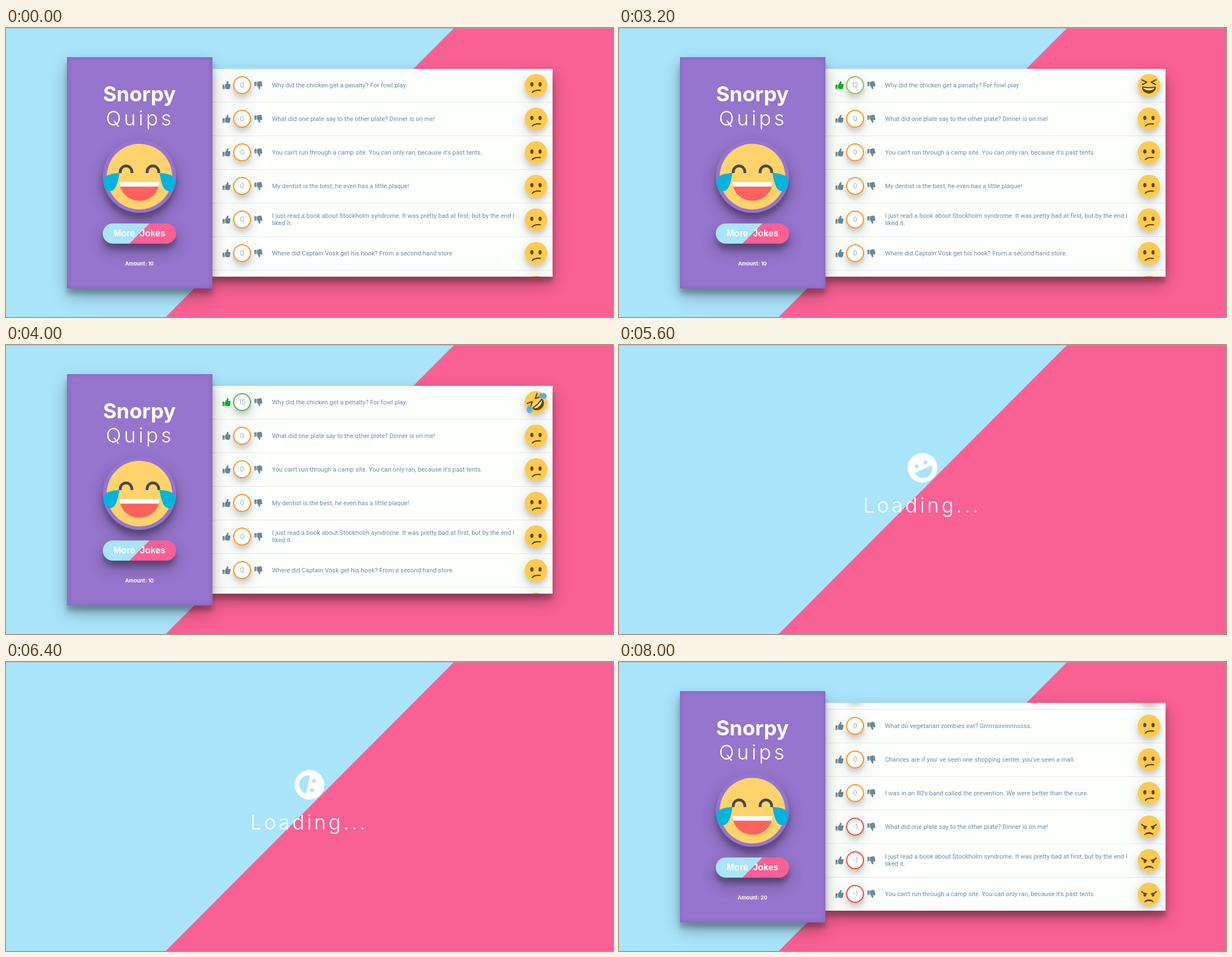
These frames come from a looping animation (1085x516 px, 10000 ms). An HTML page:

```html
<!DOCTYPE html>
<html lang="en">
<head>
<meta charset="utf-8">
<title>Snorpy Quips</title>
<style>
  html, body { margin: 0; width: 100%; height: 100%; overflow: hidden; }
  body {
    --blue: #a9e4fb; --pink: #f96093; --grey: #6d8b99;
    --lift: 0 13px 27px rgba(0,0,0,.3), 0 10px 8px rgba(0,0,0,.22);
    font-family: Inter, "Noto Sans", sans-serif;
  }
  div, svg { position: absolute; box-sizing: border-box; }
  svg { overflow: visible; }

  #stage { left: 0; top: 0; width: 1085px; height: 516px; overflow: hidden; background: var(--pink); }
  #bg { left: 0; top: 0; }
  #app, #loader { left: 0; top: 0; width: 1085px; height: 516px; }
  #app { animation: app 10s step-end infinite; }
  #loader { opacity: 0; animation: loader 10s step-end infinite; }
  @keyframes app { 0% { opacity: 1 } 56% { opacity: 0 } 72%, 100% { opacity: 1 } }
  @keyframes loader { 0% { opacity: 0 } 56% { opacity: 1 } 72%, 100% { opacity: 0 } }

  .side {
    left: 108.5px; top: 52px; width: 260.5px; height: 413px; background: #9575cd;
    box-shadow: var(--lift), inset 0 0 10px rgba(95,50,170,.3);
  }
  .badge {
    left: 173.3px; top: 199.8px; width: 130.6px; height: 130.6px;
    border-radius: 50%; background: #9575cd; box-shadow: var(--lift);
  }
  .more {
    left: 173.3px; top: 349px; width: 130.7px; height: 36.4px; border-radius: 19px;
    background: linear-gradient(135deg, var(--blue) 50%, var(--pink) 50%);
    color: #fff; font: bold 16px/36.4px "Liberation Sans", Arial, sans-serif;
    text-align: center; white-space: pre;
    box-shadow: var(--lift); animation: hover 10s step-end infinite;
  }
  @keyframes hover {
    0% { transform: none; box-shadow: var(--lift) }
    48% { transform: translateY(-1.2px); box-shadow: 0 9px 20px rgba(0,0,0,.2) }
    56%, 100% { transform: none; box-shadow: var(--lift) }
  }
  .ten { animation: first 10s step-end infinite; }
  .twenty { opacity: 0; animation: second 10s step-end infinite; }
  @keyframes first { 0% { opacity: 1 } 56%, 100% { opacity: 0 } }
  @keyframes second { 0% { opacity: 0 } 56%, 100% { opacity: 1 } }

  .card { left: 369px; top: 73px; width: 607.5px; height: 371px; background: #fdfffd; box-shadow: var(--lift); }
  .list { inset: 0; overflow: hidden; }
  #before { animation: before 10s step-end infinite; }
  #after { opacity: 0; animation: after 10s step-end infinite; }
  @keyframes before { 0% { opacity: 1 } 80%, 100% { opacity: 0 } }
  @keyframes after { 0% { opacity: 0 } 80%, 100% { opacity: 1 } }

  .row { left: 0; width: 100%; height: 60px; box-shadow: 0 1px #e4e9eb; }
  .joke {
    left: 106.5px; top: 0; height: 60px; display: flex; align-items: center; white-space: nowrap;
    color: var(--grey); font: 11.2px/13px Roboto, "Open Sans", sans-serif; letter-spacing: .05px;
  }
  .thumb { top: 23.3px; width: 14.3px; height: 14.3px; fill: var(--grey); }
  .up { left: 18px; }
  .down { left: 74.6px; }
  .liked .up { animation: like 10s step-end infinite; }
  @keyframes like { 0% { fill: var(--grey) } 8% { fill: #0db02b } 48%, 100% { fill: var(--grey) } }

  .votes, .face { border-radius: 50%; box-shadow: 0 7px 24px rgba(0,0,0,.18), 0 7px 8px rgba(0,0,0,.12); }
  .votes {
    left: 37px; top: 14px; width: 32px; height: 32px; border: 2px solid; background: #fdfffd;
    font-weight: 300; font-size: 11.5px; line-height: 28px; text-align: center;
  }
  .votes span { color: #6f93a3; }
  .face { left: 557.7px; top: 9.7px; width: 40.6px; height: 40.6px; }
  .face svg { width: 100%; height: 100%; }

  .mood { left: 0; top: 0; }
  .pop, .stay { opacity: 0; }
  .pop { animation: pop 10s step-end infinite; }
  .stay { animation: stay 10s step-end infinite; }
  @keyframes pop { 0% { opacity: 1 } 8%, 100% { opacity: 0 } }
  @keyframes stay { 0% { opacity: 1 } 50%, 100% { opacity: 0 } }

  .spin { transform: translate(542.5px, 219.3px) rotate(-24deg); animation: spin 10s step-end infinite; }
  @keyframes spin {
    0% { transform: translate(542.5px, 219.3px) rotate(-24deg) }
    64%, 100% { transform: translate(542.5px, 219.3px) rotate(101deg) }
  }
  .edge { left: 0; top: 0; width: 100%; height: 1px; background: rgba(165,172,178,.75); }
</style>
</head>
<body>
<svg width="0" height="0">
  <defs>
    <path id="hand" d="M160 240C210 190 220 150 252 118C282 88 275 0 312 0C340 0 384 12 384 81C384 124 358 148 351 176H452C525 176 530 255 492 283C505 310 500 340 483 363C492 390 483 420 467 437C475 490 445 512 347 512C260 512 215 465 160 464Z"/>
    <path id="cuff" fill-rule="evenodd" d="M0 248Q0 224 24 224H104Q128 224 128 248V488Q128 512 104 512H24Q0 512 0 488ZM40 448a24 24 0 1 0 48 0a24 24 0 1 0 -48 0Z"/>
    <g id="up"><use href="#hand"/><use href="#cuff"/></g>
    <g id="down"><use href="#hand" transform="matrix(1 0 0 -1 0 512)"/><use href="#cuff" y="-192"/></g>

    <circle id="disc" cx="18" cy="18" r="18" fill="#fdca50"/>
    <g id="eyes"><ellipse cx="11.5" cy="16.5" rx="2.5" ry="3.5"/><ellipse cx="24.5" cy="16.5" rx="2.5" ry="3.5"/></g>
    <path id="curve" d="M10.5 23.6C10.6 23.8 11.7 28 18 28S25.4 23.8 25.5 23.6C25.5 23 25 22.8 24.6 23.1C24 23.7 22 25 18 25S12 23.7 11.4 23.1C11 22.8 10.5 23 10.5 23.6Z"/>
    <g id="grin">
      <path d="M18 21C14.4 21 12 20.6 9 20C8.3 19.9 7 20 7 22C7 26 11.6 31 18 31S29 26 29 22C29 20 27.7 19.9 27 20C24 20.6 21.6 21 18 21Z"/>
      <path fill="#fff" d="M9 22S12 23 18 23S27 22 27 22S25 26 18 26S9 22 9 22Z"/>
    </g>
    <path id="squint" d="M7 9.5L14.5 13L7.5 16.8M29 9.5L21.5 13L28.5 16.8" fill="none" stroke="#664500" stroke-width="2" stroke-linecap="round" stroke-linejoin="round"/>
    <path id="drop" fill="#5dadec" d="M27.3 14.6C29 11.5 38 14 38.3 19.5C38.4 24.5 33 25.6 30.6 22.4C28.8 20 26.8 17.5 27.3 14.6Z"/>

    <g id="confused"><use href="#eyes"/><path d="M12.3 29.2C15 26 19 25.4 25 26" fill="none" stroke="#664500" stroke-width="2" stroke-linecap="round"/></g>
    <g id="neutral"><use href="#eyes"/><rect x="10" y="24" width="16" height="2" rx="1"/></g>
    <g id="smile"><use href="#eyes" y="-3"/><use href="#curve"/></g>
    <g id="happy"><use href="#eyes" y="-3"/><use href="#grin"/></g>
    <g id="laugh"><use href="#squint"/><use href="#grin"/></g>
    <g id="rolling" transform="rotate(-45 18 18)">
      <use href="#squint"/><use href="#grin"/>
      <use href="#drop"/><use href="#drop" transform="matrix(-1 0 0 1 36 0)"/>
    </g>
    <g id="angry">
      <ellipse cx="11.5" cy="19" rx="2.1" ry="3"/><ellipse cx="24.5" cy="19" rx="2.1" ry="3"/>
      <path d="M6.5 14.2Q9 17.2 14.3 17.8M29.5 14.2Q27 17.2 21.7 17.8" fill="none" stroke="#664500" stroke-width="2" stroke-linecap="round"/>
      <use href="#curve" transform="matrix(1 0 0 -1 0 54.3)"/>
    </g>
    <path id="tear" fill="#00b4dd" d="M202.8 259C190 259 175 263 174.2 272C173.5 281 178 291.3 186 291.3C196 291.3 200 276 202.8 259Z"/>
  </defs>
</svg>

<div id="stage">
  <svg id="bg" width="1085" height="516"><path fill="#a9e4fb" d="M0 0H801L285.5 516H0Z"/></svg>

  <div id="app">
    <div class="card">
      <div class="list" id="before"></div>
      <div class="list" id="after"></div>
    </div>
    <div class="side"></div>
    <div class="badge"></div>
    <svg width="1085" height="516">
      <g fill="#fff" text-anchor="middle">
        <text x="238.5" y="131" font-size="37" font-weight="700">Snorpy</text>
        <text x="239.5" y="174" font-size="36" font-weight="300" letter-spacing="5">Quips</text>
        <g font-size="9.2" font-weight="700">
          <text class="ten" x="238.5" y="424.3">Amount: 10</text>
          <text class="twenty" x="238.5" y="424.3">Amount: 20</text>
        </g>
      </g>
      <circle cx="238.6" cy="265.4" r="58.6" fill="#ffd36c"/>
      <path d="M204.2 259V257a10.4 10.8 0 0 1 20.8 0V259M252.2 259V257a10.4 10.8 0 0 1 20.8 0V259" fill="none" stroke="#4a4a4c" stroke-width="5"/>
      <path d="M203 275H274.2A35.6 33.6 0 0 1 203 275Z" fill="#ff625c"/>
      <path d="M203 275H274.2Q274.2 279 273 283.3H204.2Q203 279 203 275Z" fill="#fff"/>
      <use href="#tear"/>
      <use href="#tear" transform="matrix(-1 0 0 1 477.2 0)"/>
    </svg>
    <div class="more">More&nbsp; Jokes</div>
  </div>

  <div id="loader">
    <svg width="1085" height="516" fill="#fff">
      <path class="spin" fill-rule="evenodd" d="M-26.5 0a26.5 26.5 0 1 0 53 0a26.5 26.5 0 1 0 -53 0ZM-12 -6.5a3.4 3.4 0 1 0 6.8 0a3.4 3.4 0 1 0 -6.8 0ZM5.2 -6.5a3.4 3.4 0 1 0 6.8 0a3.4 3.4 0 1 0 -6.8 0ZM-14.8 2.6H14.8Q16.6 2.6 16.3 4.4C14.8 12.6 8 18.4 0 18.4S-14.8 12.6 -16.3 4.4Q-16.6 2.6 -14.8 2.6Z"/>
      <text x="436.5" y="298.5" font-size="36" font-weight="300" letter-spacing="4.5">Loading...</text>
    </svg>
  </div>
  <div class="edge"></div>
</div>

<script>
  const levels = [
    [15, '#4caf50', 'rolling'], [12, '#8bc34a', 'laugh'], [9, '#cddc39', 'happy'],
    [6, '#ffeb3b', 'smile'], [3, '#ffc107', 'neutral'], [0, '#fc921f', 'confused'],
    [-Infinity, '#f44336', 'angry']
  ];
  const plate = 'What did one plate say to the other plate? Dinner is on me!';
  const camp = "You can't run through a camp site. You can only ran, because it's past tents.";
  const book = 'I just read a book about Stockholm syndrome. It was pretty bad at first, but by the end I<br>liked it.';

  const thumb = id => `<svg class="thumb ${id}" viewBox="0 0 512 512"><use href="#${id}"/></svg>`;

  function mood(score, cls = '', delay = 0) {
    const [, color, face] = levels.find(([min]) => score >= min);
    return `<div class="mood ${cls}" style="animation-delay:${delay}s">
      <div class="votes" style="border-color:${color}"><span>${score}</span></div>
      <div class="face"><svg viewBox="0 0 36 36" fill="#664500"><use href="#disc"/><use href="#${face}"/></svg></div>
    </div>`;
  }

  // The first joke is voted up by three every 0.8 s, ending at 15.
  const climb = [0, 3, 6, 9, 12, 15]
    .map((n, i) => mood(n, n < 15 ? 'pop' : 'stay', i * 0.8)).join('');

  const row = (joke, top, moods, cls = '') =>
    `<div class="row ${cls}" style="top:${top}px">${thumb('up')}${thumb('down')}${moods}<div class="joke"><span>${joke}</span></div></div>`;

  document.getElementById('before').innerHTML = [
    'Why did the chicken get a penalty? For fowl play.',
    plate, camp,
    'My dentist is the best, he even has a little plaque!',
    book,
    'Where did Captain Vosk get his hook? From a second hand store.',
    ''
  ].map((joke, i) => row(joke, i * 60 - 1, i ? mood(0) : climb, i ? '' : 'liked')).join('');

  document.getElementById('after').innerHTML = [
    '',
    'What do vegetarian zombies eat? Grrrrrainnnnnssss.',
    "Chances are if you' ve seen one shopping center, you've seen a mall.",
    "I was in an 80's band called the prevention. We were better than the cure.",
    plate, book, camp
  ].map((joke, i) => row(joke, i * 60 - 49, mood(i < 4 ? 0 : -1))).join('');
</script>
</body>
</html>
```
